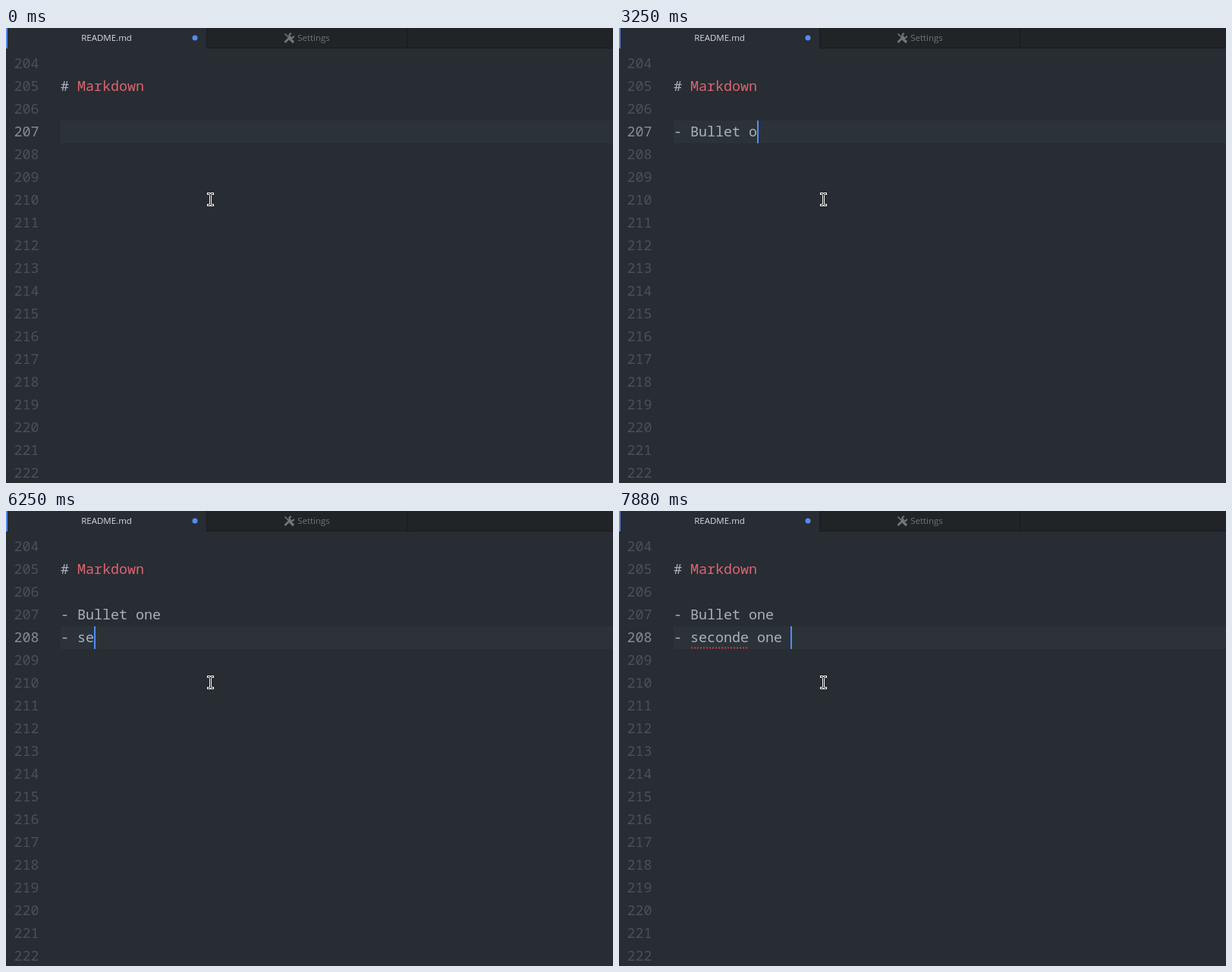
Recreate the animation shown at these times as an HTML page. Size 800 by 600 pixels, loop 8 s.

```html
<!DOCTYPE html>
<html lang="en">
<head>
<meta charset="utf-8">
<title>Editor typing</title>
<style>
  html, body { margin: 0; width: 100%; height: 100%; overflow: hidden; background: #282c33; }
  svg { display: block; width: 800px; height: 600px; }
  text { white-space: pre; }
  .code { font: 18.333px "Noto Sans Mono", "DejaVu Sans Mono", monospace; fill: #abb2bf; }
  .tab { font: 11.5px "Open Sans", "Noto Sans", sans-serif; text-anchor: middle; }
  .num { fill: #4a505c; }
  .num.on { fill: #858c98; }
  .item { fill: #989da5; }
  .item.on { fill: #c3c7cd; }
  .hit { font-weight: 700; fill: #dadde2; }
  .on .hit { fill: #fff; }
</style>
</head>
<body>
<svg viewBox="0 0 800 600">
  <defs>
    <filter id="shade" x="-10%" y="-10%" width="120%" height="120%">
      <feDropShadow dx="0" dy="1" stdDeviation="2.5" flood-color="#000" flood-opacity=".3"/>
    </filter>
  </defs>
  <rect width="800" height="600" fill="#282c33"/>

  <rect x="264" width="536" height="27" fill="#202427"/>
  <path d="M264.5 0V26.5H800M528.5 0V26" fill="none" stroke="#191c1f"/>
  <rect width="2" height="27" fill="#568af2"/>
  <text class="tab" x="132.5" y="17" fill="#d7dae0">README.md</text>
  <circle cx="249" cy="13" r="3.5" fill="#568af2"/>
  <g fill="none" stroke="#70767e">
    <path d="M367.5 7.500L373 13" stroke-width="1.6"/>
    <path d="M374 14L379 19" stroke-width="3.4"/>
    <path d="M367.500 19L375.500 11" stroke-width="2.600"/>
    <path d="M376 7.200A3 3 0 1 0 379.300 10.500" stroke-width="2"/>
  </g>
  <text class="tab" x="405.500" y="17" fill="#6f757e">Settings</text>

  <rect id="active" x="72" width="728" height="30" fill="#2b3339"/>
  <g id="gutter"></g>
  <text class="code" x="72" y="83"># <tspan fill="#db6570">Markdown</tspan></text>
  <text id="first" class="code" x="72" y="143"></text>
  <text id="second" class="code" x="72" y="173"></text>
  <path id="typo" d="M95 180.500H171" stroke="#c93f3f" stroke-width="2" stroke-dasharray="2 2"/>
  <rect id="caret" width="2" height="30" fill="#528bff"/>
  <g id="popup"></g>

  <g id="beam" fill="none">
    <path d="M265 218.500H268L269.500 219.500L271 218.500H274M269.500 219V233M265 233.500H268L269.500 232.500L271 233.500H274" stroke="#fff" stroke-width="3"/>
    <path d="M266 218.500H268L269.500 219.500L271 218.500H273M269.500 219V233M266 233.500H268L269.500 232.500L271 233.500H273" stroke="#111"/>
  </g>
  <path id="arrow" d="M267.500 226V242L271 238.700L273.400 244L276 242.800L273.600 237.700H278.500Z" fill="#fff" stroke="#111"/>
</svg>
<script>
const LOOP = 8000, COL = 11, ROW = 30, LEFT = 72;
const $ = id => document.getElementById(id);
const one = "- Bullet one ";
const words = ["ones", "online", "longer", "concrete", "container", "bounce", "githubusercontent"];
const moreWords = [...words.slice(0, 3), "seconde", ...words.slice(3)];

// Popups: typed prefix, word column, matches, width, icon column
const ones = { prefix: "one", col: 9, list: words, width: 267, icons: true };
const onesAgain = { ...ones, col: 10, list: moreWords };
const sec = { prefix: "sec", col: 2, list: ["second", "githubusercontent"], width: 243, icons: false };
const secon = { ...sec, prefix: "secon" };

// Time, text up to the caret, caret shown, popup
const steps = [
  [0, "", 0], [130, "", 1], [380, "", 0],
  [630, "-", 1], [1000, "-", 0], [1250, "-", 1],
  [1380, "- ", 1], [1500, "- ", 0], [1630, "- ", 1], [1880, "- ", 0],
  [2130, "- B", 1], [2250, "- Bu", 1], [2500, "- Bull", 1], [2630, "- Bulle", 1],
  [2880, "- Bullet", 1], [3000, "- Bullet ", 1],
  [3250, "- Bullet o", 1], [3380, "- Bullet on", 1],
  [3500, "- Bullet one", 1, ones], [3750, "- Bullet one", 0, ones],
  [4000, "- Bullet one", 1], [4130, one, 1], [4500, one, 0],
  [4880, one + "\n- ", 1], [5130, one + "\n- ", 0],
  [5380, one + "\n- ", 1], [5630, one + "\n- ", 0], [5880, one + "\n- ", 1],
  [6130, one + "\n- s", 1], [6250, one + "\n- se", 1],
  [6380, one + "\n- sec", 1, sec], [6500, one + "\n- secon", 1, secon],
  [6630, one + "\n- second", 1], [6750, one + "\n- seconde", 1],
  [6880, one + "\n- seconde ", 1], [7000, one + "\n- seconde o", 1],
  [7130, one + "\n- seconde on", 1], [7250, one + "\n- seconde one", 1, onesAgain],
  [7630, one + "\n- seconde one ", 1]
];

for (let i = 0; i < 19; i++) {
  $("gutter").innerHTML += `<text class="code num" x="10.5" y="${53 + i * ROW}">${204 + i}</text>`;
}
const numbers = $("gutter").children;

function show(id, visible) {
  $(id).setAttribute("visibility", visible ? "visible" : "hidden");
}

function markHits(word, prefix) {
  let next = 0;
  return [...word].map(c => {
    if (c !== prefix[next]) return c;
    next++;
    return `<tspan class="hit">${c}</tspan>`;
  }).join("");
}

function popupMarkup({ prefix, col, list, width, icons }, top) {
  const textX = LEFT + col * COL;
  const x = textX - (icons ? 55 : 12);
  let out = `<rect x="${x}" y="${top}" width="${width}" height="${list.length * 40 + 1}" rx="2" fill="#21252b" filter="url(#shade)"/>
    <rect x="${x}" y="${top}" width="${width}" height="40" fill="#3a3f48"/>`;
  if (icons) {
    out += `<rect x="${x}" y="${top + 40}" width="40" height="40" fill="#4a333a"/>
      <text class="code" x="${x + 14.5}" y="${top + 65}" style="font-weight:700;font-size:17px;fill:#cf6570">v</text>`;
  }
  list.forEach((word, i) => {
    out += `<text class="code item${i ? "" : " on"}" x="${textX}" y="${top + 26 + i * 40}">${markHits(word, prefix)}</text>`;
  });
  return out;
}

function render([time, text, caretOn, popup]) {
  const lines = text.split("\n");
  const row = lines.length - 1;
  const top = 122 + row * ROW;
  $("first").textContent = lines[0];
  $("second").textContent = lines[1] || "";
  $("active").setAttribute("y", top);
  $("caret").setAttribute("x", LEFT + lines[row].length * COL);
  $("caret").setAttribute("y", top);
  [...numbers].forEach((n, i) => n.classList.toggle("on", i === 3 + row));
  $("popup").innerHTML = popup ? popupMarkup(popup, top + ROW) : "";
  show("caret", caretOn);
  show("typo", time >= 6880);
  show("beam", !popup);
  show("arrow", popup);
}

let current;
const start = performance.now();
function tick() {
  const t = (performance.now() - start) % LOOP;
  const step = steps.findLast(s => s[0] <= t);
  if (step !== current) render(current = step);
  requestAnimationFrame(tick);
}
tick();
</script>
</body>
</html>
```
